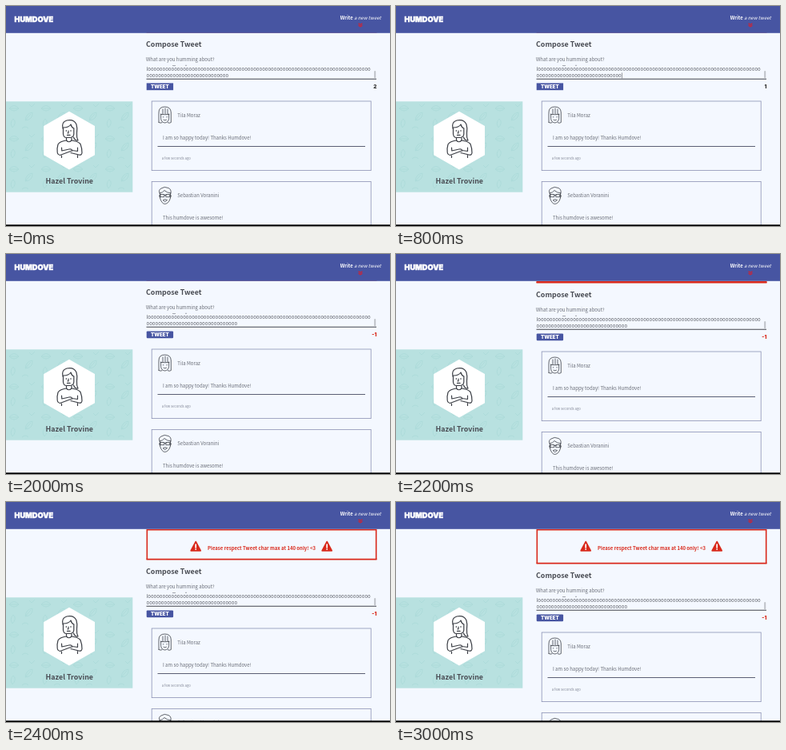
An HTML page that plays this animation: 480x275 px, repeating every 3.2 s.

```html
<!DOCTYPE html>
<html lang="en">
<head>
<meta charset="utf-8">
<title>Compose</title>
<style>
  html, body { margin: 0; width: 100%; height: 100%; overflow: hidden; background: #f4f8ff; }
  svg { display: block; width: 100vw; height: 100vh; }
  text {
    font: 6px "Noto Sans CJK JP", "Noto Sans CJK SC", "Noto Sans CJK", "Open Sans", sans-serif;
    fill: #686c75;
  }
  .title { font-size: 8.9px; font-weight: 700; fill: #4a4d54; }
  .typed { font-size: 6.05px; fill: #55585f; }
  .time { font-size: 4.3px; fill: #858a98; }
  .chunky { font: 900 6.2px Inter, sans-serif; fill: #fff; }
  .brand { font-size: 9.2px; stroke: #fff; stroke-width: .45; }
  .count { font-size: 6.4px; fill: #333; text-anchor: end; }
  .alert { font-weight: 700; fill: #d92a1c; }
  .card { fill: none; stroke: #8c93b4; stroke-width: .8; }
  .ink { fill: none; stroke: #3d4047; stroke-width: .8; stroke-linecap: round; stroke-linejoin: round; }

  .feed, .key, .caret, .count, .button { animation: 3200ms step-end infinite; }
  .feed { animation-name: slide; }
  .button { animation-name: hover; }
  .caret { animation-name: caret; }
  .k1 { animation-name: key1; }
  .k2 { animation-name: key2; }
  .k3 { animation-name: key3; }
  .c2 { animation-name: two; }
  .c1 { animation-name: one; }
  .c0 { animation-name: zero; }
  .over { animation-name: over; fill: #d92a1c; }

  @keyframes slide {
    0% { transform: translateY(0); }
    68.75% { transform: translateY(3px); }
    71.875% { transform: translateY(24.5px); }
    75% { transform: translateY(39px); }
    78.125%, 100% { transform: translateY(44px); }
  }
  @keyframes hover { 0% { rx: 0; } 53.125%, 100% { rx: 1.2px; } }
  @keyframes key1 { 0% { visibility: hidden; } 21.875%, 100% { visibility: visible; } }
  @keyframes key2 { 0% { visibility: hidden; } 28.125%, 100% { visibility: visible; } }
  @keyframes key3 { 0% { visibility: hidden; } 40.625%, 100% { visibility: visible; } }
  @keyframes caret {
    0% { opacity: 0; transform: none; }
    21.875% { opacity: 1; transform: none; }
    28.125% { opacity: 1; transform: translateX(3.67px); }
    40.625% { opacity: 1; transform: translateX(7.33px); }
    53.125%, 100% { opacity: 0; transform: none; }
  }
  @keyframes two { 0% { opacity: 1; } 25%, 100% { opacity: 0; } }
  @keyframes one { 0% { opacity: 0; } 25% { opacity: 1; } 31.25%, 100% { opacity: 0; } }
  @keyframes zero { 0% { opacity: 0; } 31.25% { opacity: 1; } 43.75%, 100% { opacity: 0; } }
  @keyframes over { 0% { opacity: 0; } 43.75%, 100% { opacity: 1; } }
</style>
</head>
<body>
<svg viewBox="0 0 480 275" preserveAspectRatio="none">
  <defs>
    <pattern id="leaves" width="40" height="38" patternUnits="userSpaceOnUse" y="119">
      <path d="M4 9q6-7 12 0q-6 6-12 0h12M24 24q1-9 9-10q1 9-9 10l7-8M8 33q-4-6 1-11q5 5-1 11M29 4l3 3l4-4M20 34q4-4 8 0"
        fill="none" stroke="#aad9d8" stroke-width=".8"/>
    </pattern>
    <g id="warn">
      <path d="M0-6L6 5.2H-6Z" fill="#d92a1c" stroke="#d92a1c" stroke-width="1.8" stroke-linejoin="round"/>
      <path d="M0-2.4V1.4M0 3.4V3.6" stroke="#fff" stroke-width="1.7" stroke-linecap="round"/>
    </g>
  </defs>

  <rect width="480" height="275" fill="#f4f8ff"/>

  <!-- Alert, uncovered as the feed moves down -->
  <path d="M176.3 78V34.8H462.7V78" fill="none" stroke="#d92a1c" stroke-width="1.6"/>
  <text class="alert" x="252" y="60.2">Please respect Tweet char max at 140 only! &lt;3</text>
  <use href="#warn" x="237.2" y="55.6"/>
  <use href="#warn" x="401.2" y="55.6"/>

  <g class="feed">
    <rect x="170" y="33" width="300" height="260" fill="#f4f8ff"/>
    <path d="M175.5 32.6H463.5" stroke="#d92a1c" stroke-width="1.6"/>
    <text class="title" x="175" y="51.4">Compose Tweet</text>
    <text x="175" y="68.6">What are you humming about?</text>

    <path d="M208 74.6h4M224 74.3h2" stroke="#777b84" stroke-width=".7"/>
    <text class="typed" id="row1" x="175.5" y="81.4"></text>
    <text class="typed" x="175.5" y="89.3"><tspan id="row2"></tspan><tspan class="key k1">o</tspan><tspan class="key k2">o</tspan><tspan class="key k3">o</tspan></text>
    <path class="caret" d="M282.3 83.4V90.4" stroke="#333" stroke-width=".6"/>
    <rect x="460.2" y="81" width="2" height="9.3" rx="1" fill="#bfc2c8"/>
    <path d="M175.5 91.3H463" stroke="#43464d" stroke-width="1.1"/>

    <rect class="button" x="175.7" y="96.4" width="33.4" height="8.8" fill="#4755a2"/>
    <text class="chunky" x="192.4" y="103" text-anchor="middle">TWEET</text>
    <text class="chunky count c2" x="463.3" y="102.7">2</text>
    <text class="chunky count c1" x="463.3" y="102.7">1</text>
    <text class="chunky count c0" x="463.3" y="102.7">0</text>
    <text class="chunky count over" x="463.3" y="102.7">-1</text>

    <rect class="card" x="182.2" y="119" width="274" height="86.6"/>
    <g class="ink">
      <path d="M191 145.5V133q0-7 7.5-7t7.8 7v12.5q-2 1.5-4 .3M191 145.5q2 1.3 4 .3"/>
      <path d="M193.6 135v5.5q.5 5 5 5.5q4.600-.5 5-5.500V135M193.400 135.500q5.200 .5 10.500 0M196 129v6M199 128v7M202 129v6"/>
      <path d="M196.300 138.800h.6M200.800 138.800h.6M197 142.300q1.800 1.400 3.500 0"/>
    </g>
    <text x="214.300" y="139">Tila Moraz</text>
    <text x="196" y="167">I am so happy today! Thanks Humdove!</text>
    <path d="M189.500 175.500H449" stroke="#4a4f66" stroke-width=".9"/>
    <text class="time" x="194.700" y="192">a few seconds ago</text>

    <rect class="card" x="182.200" y="219.400" width="274" height="86.600"/>
    <g class="ink">
      <path d="M192 234q-2-4 2-6q4-3 9-.5q4 1.500 3 6.500M192 234q4-.5 6-3.500q3 3 8 3.500"/>
      <path d="M192.500 234v6q2 7 6 7.500q5-.5 7-7.500v-6M192.300 235.700q-1.800 1.600 0 3.600M205.700 235.700q1.800 1.600 0 3.600"/>
      <path d="M193.400 235.500h4.400v3.200h-4.400zM200.200 235.500h4.400v3.200h-4.400zM197.800 236.500h2.400M196.500 242.500q2.500-1.500 5 0l-2.500 2z"/>
    </g>
    <text x="214.300" y="239.400">Sebastian Voranini</text>
    <text x="196" y="267.400">This humdove is awesome!</text>
  </g>

  <!-- Header -->
  <rect width="480" height="33.800" fill="#4755a2"/>
  <text class="chunky brand" x="10.500" y="19.900">HUMDOVE</text>
  <text x="417.800" y="17.200" style="fill:#fff"><tspan font-weight="700">Write</tspan><tspan font-style="italic"> a new tweet</tspan></text>
  <path d="M440.600 21.800l2.400 1.600l2.400-1.600M440.600 24l2.400 1.700l2.400-1.700" fill="none" stroke="#d8202c" stroke-width="1.200"/>

  <!-- Profile -->
  <rect y="119.300" width="158.300" height="113.400" fill="#b8e1e0"/>
  <rect y="119.300" width="158.300" height="113.400" fill="url(#leaves)"/>
  <path d="M79 131.800L111 150V186.200L79 204.500L47.200 186.200V150Z" fill="#fff"/>
  <g class="ink" style="stroke-width:1.200">
    <path d="M71 153q-2-8 5-10q9-2 12 5q1.500 5 .5 11q-.5 5 1.500 9q-4 .5-5.500-4"/>
    <path d="M71.500 152v8q.5 4.500 4 4.500h5q4-.5 4.300-4.500v-7M71.500 152q7 0 9.500-4q1 4 4 5"/>
    <path d="M75.300 155.500v.8M81 155.500v.8M78 156v2.800h-1M76.500 161.400h3.600"/>
    <path d="M75.500 165v3q-8 1-10.500 5q-1.500 5-.8 10q.6 3.500 4 3.300l14-5.300M82 165v3q8 1 11 4.500q2 5 2 11q-.5 3.500-4 2.500l-10-2.500"/>
    <path d="M75.500 168q3 3.500 6.500 0M69.500 177l.3 4l9-2q4-.5 4 2M89.500 177v4.500l-6.500-1M69.500 187v2.500M89.500 186.500v3"/>
  </g>
  <text class="title" x="79.300" y="222.400" text-anchor="middle">Hazel Trovine</text>

  <rect y="273.300" width="480" height="1.700" fill="#000"/>
</svg>
<script>
  document.getElementById('row1').textContent = 'l' + 'o'.repeat(76);
  document.getElementById('row2').textContent = 'o'.repeat(28);
</script>
</body>
</html>
```
